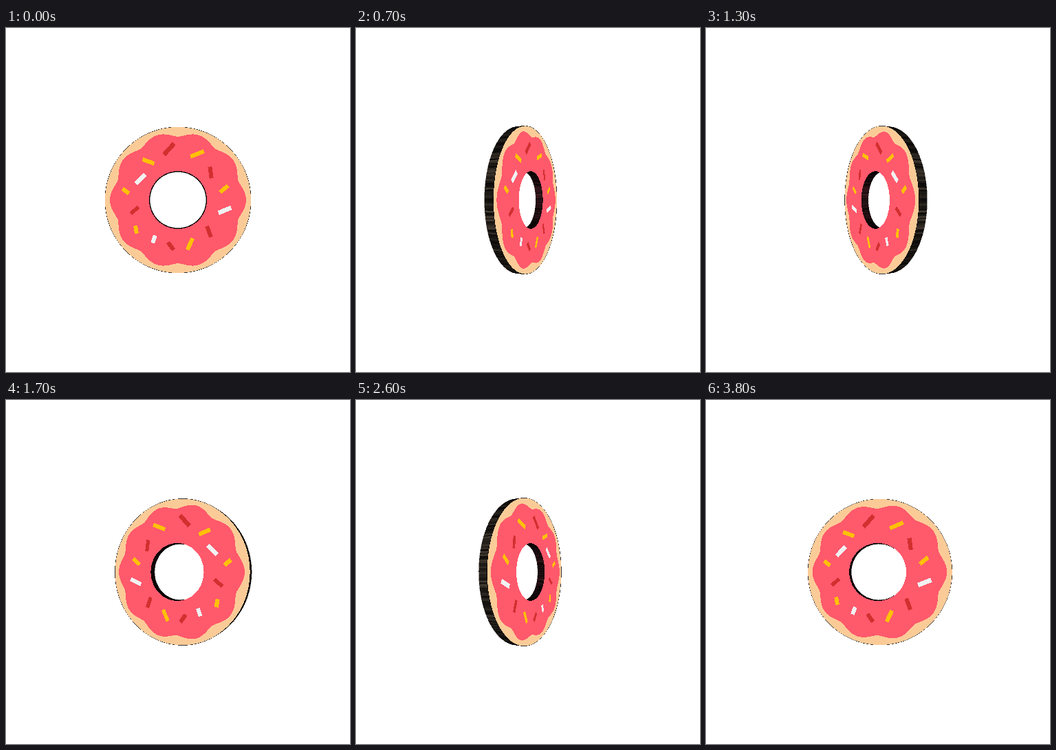
Animation, 500 px wide and 500 px high, one loop 3.9 s. Source, as an HTML page:

```html
<!DOCTYPE html>
<html lang="en">
<head>
<meta charset="utf-8">
<title>Spinning donut</title>
<style>
  html, body { margin: 0; width: 100%; height: 100%; overflow: hidden; background: #fff; }
  svg { display: block; width: 500px; height: 500px; shape-rendering: crispEdges; }
</style>
</head>
<body>
<svg id="stage" viewBox="0 0 500 500"></svg>
<script>
const LOOP = 3900, STEP = 100, TAU = Math.PI * 2;
const EYE = 450, HALF = 6.1, OUTER = 104.6, HOLE = 41.4, SEGMENTS = 320;
const UNIT = (EYE - HALF) / EYE; // flat artwork pixels to body units
const RED = '#d32f2f', YELLOW = '#ffc107', WHITE = '#f1f1f1';

// x, y, length, width, angle, colour, as seen face on
const SPRINKLES = [
  [237, 176, 22, 6.5, -48, RED], [278, 183, 21, 6, -22, YELLOW],
  [207, 194, 18, 6, 20, YELLOW], [297.5, 210, 17, 6, 82, RED],
  [195.5, 219.5, 19, 6.5, -45, WHITE], [317, 234, 15, 6, -40, YELLOW],
  [174, 237, 11.5, 6, 38, YELLOW], [187, 265, 15, 5.5, -40, RED],
  [318, 265, 20, 6.5, -22, WHITE], [189, 293, 11.5, 6, 80, YELLOW],
  [295, 296, 17, 6, 70, RED], [215, 307, 11.5, 6, 110, WHITE],
  [239.5, 317, 14, 6, 54, RED], [267.5, 314, 18, 6, 115, YELLOW]
];

const stage = document.getElementById('stage');

function addPath(attrs) {
  const el = document.createElementNS('http://www.w3.org/2000/svg', 'path');
  for (const key in attrs) el.setAttribute(key, attrs[key]);
  stage.appendChild(el);
  return el;
}

let seed = 17;
function random() {
  seed = (seed * 16807) % 2147483647;
  return seed / 2147483647;
}

function polar(radius, count = 160) {
  return Array.from({ length: count }, (_, i) => {
    const a = i / count * TAU, r = radius(a);
    return [r * Math.cos(a), r * Math.sin(a)];
  });
}

function bar([x, y, length, width, angle]) {
  const a = angle * Math.PI / 180, c = Math.cos(a), s = Math.sin(a);
  return [[-1, -1], [1, -1], [1, 1], [-1, 1]].map(([i, j]) => {
    const u = i * length / 2, v = j * width / 2;
    return [(x - 250 + u * c - v * s) * UNIT, (y - 250 + u * s + v * c) * UNIT];
  });
}

function makeWall(radius, facing, tint) {
  return Array.from({ length: SEGMENTS }, (_, i) => ({
    radius, facing, tint,
    from: i / SEGMENTS * TAU,
    to: (i + 1) / SEGMENTS * TAU,
    shade: 0.15 + 0.85 * random() ** 1.3,
    el: addPath({ 'stroke-width': 0.4 })
  }));
}

const walls = [
  ...makeWall(HOLE, -1, [74, 34, 40]),
  ...makeWall(OUTER, 1, [80, 70, 59])
];

const rim = polar(() => OUTER - 0.1);
const hole = polar(() => HOLE);
const icing = polar(a => (92 + 7 * Math.abs(Math.cos(5 * a)) ** 1.5) * UNIT, 240);

const faces = [
  { rings: [rim], el: addPath({ fill: 'none', stroke: '#000', 'stroke-width': 0.8 }) },
  { rings: [rim, hole], el: addPath({ fill: '#fbcb97', 'fill-rule': 'evenodd' }) },
  { rings: [icing, hole], el: addPath({ fill: '#ff596c', 'fill-rule': 'evenodd' }) },
  ...SPRINKLES.map(item => ({ rings: [bar(item)], el: addPath({ fill: item[5] }) }))
];

function draw(angle) {
  const c = Math.cos(angle), s = Math.sin(angle);

  const project = (x, y, z) => {
    const k = EYE / (EYE + x * s - z * c);
    return (250 + (x * c + z * s) * k).toFixed(2) + ' ' + (250 + y * k).toFixed(2);
  };

  for (const w of walls) {
    const mid = (w.from + w.to) / 2;
    const depth = -Math.cos(mid) * s;
    const seen = w.facing * (EYE * depth - w.radius) > 0;
    w.el.setAttribute('display', seen ? 'inline' : 'none');
    if (!seen) continue;
    const corner = (a, z) => project(w.radius * Math.cos(a), w.radius * Math.sin(a), z);
    w.el.setAttribute('d', 'M' + [
      corner(w.from, HALF), corner(w.to, HALF), corner(w.to, -HALF), corner(w.from, -HALF)
    ].join('L') + 'Z');
    const light = Math.max(0, w.facing * depth) * w.shade;
    const color = `rgb(${w.tint.map(v => Math.round(v * light)).join(',')})`;
    w.el.setAttribute('fill', color);
    w.el.setAttribute('stroke', color);
  }

  const z = c > 0 ? HALF : -HALF;
  for (const f of faces) {
    f.el.setAttribute('d', f.rings.map(ring =>
      'M' + ring.map(([x, y]) => project(x, y, z)).join('L') + 'Z').join(''));
  }
}

function tick() {
  const step = Math.floor((performance.now() % LOOP) / STEP);
  draw(step * STEP / LOOP * TAU);
  requestAnimationFrame(tick);
}
tick();
</script>
</body>
</html>
```
